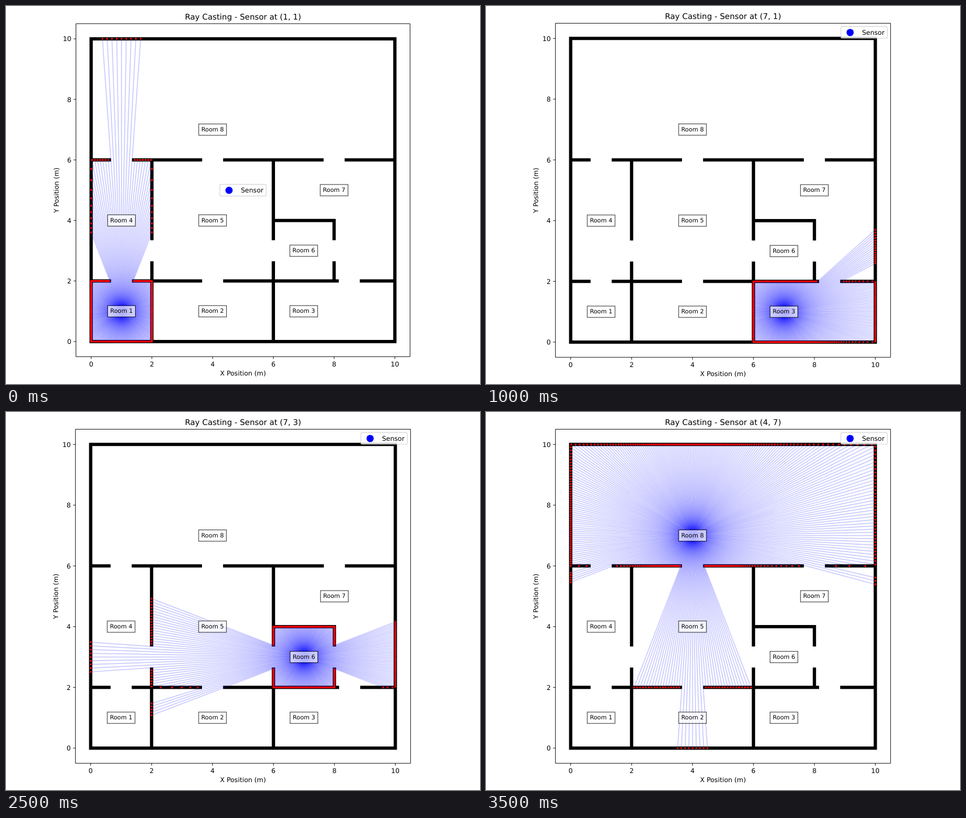
An HTML page for the animation above (4 s loop, 837x669 px).

```html
<!DOCTYPE html>
<html lang="en">
<head>
<meta charset="utf-8">
<title>Ray Casting</title>
<style>
  html, body { margin: 0; width: 100%; height: 100%; overflow: hidden; background: #fff; }
  svg { display: block; width: 837px; height: 669px; }
  text { font-family: "DejaVu Sans", sans-serif; font-size: 13.89px; text-rendering: geometricPrecision; }
  .title { font-size: 16.67px; }
  .room { font-size: 12.5px; }
  .mid { text-anchor: middle; }
  .end { text-anchor: end; }
  .frame { fill: none; stroke: #000; stroke-width: 1.1; }
  .walls { fill: none; stroke: #000; stroke-width: 6.94; stroke-linecap: square; }
  .rays { stroke: #00f; stroke-opacity: .2; stroke-width: 2.08; stroke-linecap: square; }
  .hits { fill: #f00; }
  .tag { fill: #fff; stroke: #000; stroke-width: 1.39; opacity: .7; fill-opacity: 1; }
  .legend { fill: #fff; fill-opacity: .8; stroke: #ccc; stroke-opacity: .8; stroke-width: 1.39; }
</style>
</head>
<body>
<svg id="stage" viewBox="0 0 1000 800" preserveAspectRatio="none"></svg>
<script>
const stage = document.getElementById('stage');
const STEP = 500;

// Room centres, in metres; the sensor visits each in turn.
const rooms = [[1, 1], [4, 1], [7, 1], [1, 4], [4, 4], [7, 3], [8, 5], [4, 7]];

// Wall pieces as [fixed coordinate, from, to].
const flat = [
  [0, 0, 10], [10, 0, 10], [4, 6, 8],
  [2, 0, .6], [2, 1.4, 3.6], [2, 4.4, 8.1], [2, 8.9, 10],
  [6, 0, .6], [6, 1.4, 3.6], [6, 4.4, 7.6], [6, 8.4, 10]
];
const upright = [
  [0, 0, 10], [10, 0, 10],
  [2, 0, 2.6], [2, 3.4, 6],
  [6, 0, 2.6], [6, 3.4, 6],
  [8, 2, 2.6], [8, 3.4, 4]
];

const firstPlot = { left: 147.6, top: 37.4, size: 704.8 };
const plot = { left: 146.5, top: 36.5, size: 707 };

// Nearest wall hit from (x, y) at an angle in degrees.
function cast(x, y, deg) {
  const a = deg * Math.PI / 180, dx = Math.cos(a), dy = Math.sin(a), e = 1e-9;
  let best = Infinity;
  const test = (dist, speed, from, side, a0, a1) => {
    if (Math.abs(speed) < e) return;
    const t = dist / speed, s = from + t * side;
    if (t > e && t < best && s >= a0 - e && s <= a1 + e) best = t;
  };
  for (const [c, p, q] of flat) test(c - y, dy, x, dx, p, q);
  for (const [c, p, q] of upright) test(c - x, dx, y, dy, p, q);
  return [x + best * dx, y + best * dy];
}

const num = v => v.toFixed(2);
const label = (x, y, s, cls, extra = '') =>
  `<text x="${num(x)}" y="${num(y)}" class="${cls}" ${extra}>${s}</text>`;
const disc = (x, y, r, extra = '') =>
  `<circle cx="${num(x)}" cy="${num(y)}" r="${r}" ${extra}/>`;

function drawAxes(box, X, Y) {
  const { left, top, size } = box, bottom = top + size, mid = top + size / 2;
  let d = `M${left} ${top}h${size}v${size}h${-size}z`, out = '';
  for (let v = 0; v <= 10; v += 2) {
    d += `M${X(v)} ${bottom}v4.86M${left} ${Y(v)}h-4.86`;
    out += label(X(v), bottom + 20.5, v, 'mid') + label(left - 9.72, Y(v) + 5.3, v, 'end');
  }
  const yx = left - 36;
  return `<path class="frame" d="${d}"/>` + out +
    label(500, bottom + 40.3, 'X Position (m)', 'mid') +
    label(yx, mid, 'Y Position (m)', 'mid', `transform="rotate(-90 ${yx} ${mid})"`);
}

function drawLegend(x, y) {
  return `<rect class="legend" x="${num(x)}" y="${num(y)}" width="97.8" height="24.7" rx="2.8"/>` +
    disc(x + 19.4, y + 12.6, 7.64, 'fill="#00f"') +
    label(x + 44.4, y + 17, 'Sensor', '');
}

function drawScene(i) {
  const box = i ? plot : firstPlot, unit = box.size / 11;
  const X = v => box.left + (v + .5) * unit;
  const Y = v => box.top + (10.5 - v) * unit;
  const [sx, sy] = rooms[i];

  let walls = '', rays = '', hits = '', tags = '';
  for (const [c, p, q] of flat) walls += `M${X(p)} ${Y(c)}H${X(q)}`;
  for (const [c, p, q] of upright) walls += `M${X(c)} ${Y(p)}V${Y(q)}`;
  for (let deg = 0; deg < 360; deg++) {
    const [hx, hy] = cast(sx, sy, deg);
    rays += `<path d="M${num(X(sx))} ${num(Y(sy))}L${num(X(hx))} ${num(Y(hy))}"/>`;
    hits += disc(X(hx), Y(hy), 2.08);
  }
  rooms.forEach(([x, y], n) => {
    tags += `<rect class="tag" x="${num(X(x) - 29.3)}" y="${num(Y(y) - 12)}" width="58.6" height="24"/>` +
      label(X(x), Y(y) + 3.6, 'Room ' + (n + 1), 'room mid');
  });

  const legend = i
    ? drawLegend(box.left + box.size - 104.7, box.top + 6.94)
    : drawLegend(451.1, box.top + box.size / 2 - 12.35);

  stage.innerHTML =
    `<path class="walls" d="${walls}"/><g class="rays">${rays}</g><g class="hits">${hits}</g>` +
    disc(X(sx), Y(sy), 7.64, 'fill="#00f"') +
    drawAxes(box, X, Y) + tags + legend +
    label(500, box.top - 8.4, `Ray Casting - Sensor at (${sx}, ${sy})`, 'title mid');
}

const start = performance.now();
let shown = -1;
function update() {
  const i = Math.floor((performance.now() - start) / STEP) % rooms.length;
  if (i !== shown) drawScene(shown = i);
  requestAnimationFrame(update);
}
update();
</script>
</body>
</html>
```
